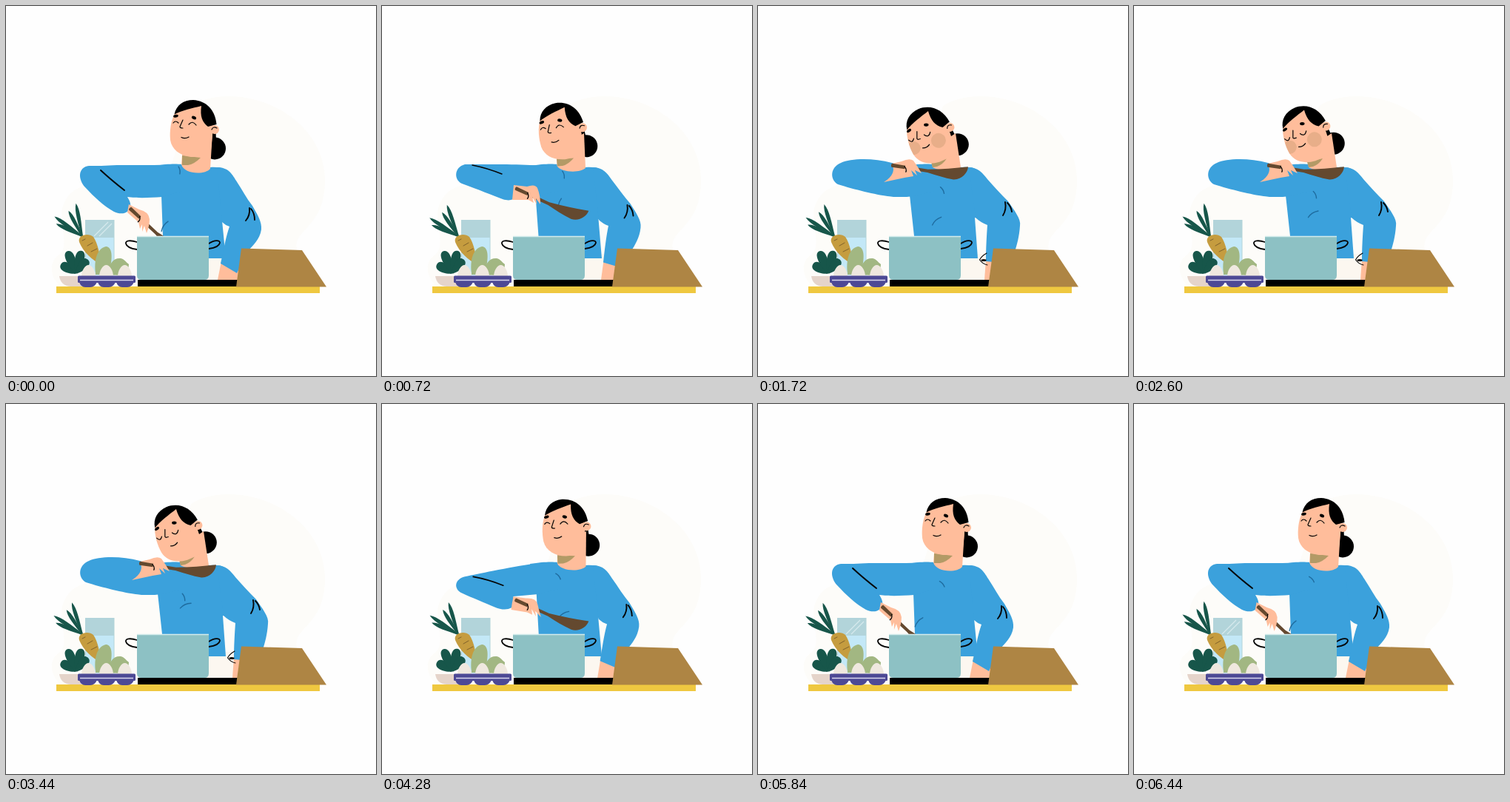
An HTML page that plays this animation: 500 by 500 pixels, repeating every 6.48 s.

```html
<!DOCTYPE html>
<html lang="en">
<head>
<meta charset="utf-8">
<title>Cooking</title>
<style>
  html, body { margin: 0; width: 100%; height: 100%; overflow: hidden; background: #fefefe; }
  svg { display: block; width: 100vw; height: 100vh; }
  .skin { fill: #ffbd9b; }
  .shirt { fill: #3ba1dc; }
  .wood { fill: #64492f; }
  .leaf { fill: #17564a; }
  .sage { fill: #a2b782; }
  .egg { fill: #efe8df; }
  .tray { fill: #4d4995; }
  .line { fill: none; stroke: #050505; stroke-linecap: round; stroke-linejoin: round; }
  .fold { fill: none; stroke: #1f6c9f; stroke-width: 1.4; stroke-linecap: round; }
</style>
</head>
<body>
<svg viewBox="0 0 500 500">
  <defs>
    <path id="face" d="M229 143C222 156 221 170 222 181C224 194 235 202 250 204L276 204L279 174L281 145L260 132Z"/>
    <clipPath id="faceClip"><use href="#face"/></clipPath>
  </defs>

  <path fill="#fdfcf9" d="M250 135C286 112 350 121 388 152C424 180 438 222 428 262C422 290 400 303 394 316C388 330 402 350 395 379H74C58 365 58 345 72 336C84 326 76 305 75 285C74 265 88 247 106 243L215 240Z"/>
  <path fill="#fcf7f0" d="M270 335H316V372H270Z"/>

  <!-- body -->
  <path id="farHand" class="skin"/>
  <path id="torso" class="shirt"/>
  <path id="farArm" class="shirt"/>
  <path id="farCrease" class="line" stroke-width="1.9"/>
  <g id="bun">
    <circle cx="282" cy="192.500" r="15"/>
    <path d="M278 170H283.500L284 182H276Z"/>
  </g>
  <path id="arm" class="shirt"/>
  <path id="crease" class="line"/>
  <path id="fold1" class="fold" d="M-5 0Q0 -2 5 0"/>
  <path id="fold2" class="fold" d="M-8 -1Q0 -4 8 0"/>
  <path id="neck" class="skin"/>
  <path id="shade" fill="#b39a66"/>

  <g id="head">
    <use href="#face" class="skin"/>
    <g id="blush" fill="#e8ae89" clip-path="url(#faceClip)">
      <circle cx="226" cy="173" r="9"/>
      <circle cx="260.500" cy="177" r="10"/>
    </g>
    <path d="M227.500 146.500C230 134 240 127 253 127C271 128 283 141 284.500 160L273 163C265 157 262 149 264 135C252 138 238 141 227.500 146.500Z"/>
    <circle class="skin" cx="282" cy="167" r="6"/>
    <path class="line" stroke-width="1.200" d="M278 167Q280 162 285 165"/>
    <ellipse cx="229.500" cy="148.700" rx="3.400" ry="1.900" transform="rotate(-12 229.500 148.700)"/>
    <ellipse cx="254" cy="151" rx="3.200" ry="2.100" transform="rotate(22 254 151)"/>
    <path id="eyes" class="line" stroke-width="1.200"/>
    <path class="line" stroke-width="1.200" d="M239 154L235 163Q235 165 239 165"/>
    <path class="line" stroke-width="1.300" d="M237 177.500Q242 180 247 177"/>
  </g>

  <!-- hand and ladle -->
  <path id="ladle" class="wood" d="M1 -2.200L50 -2Q78 -7 103 -14C104 -6 97 5 86 6C74 6 62 4 50 2.200L1 2.200Q-1 0 1 -2.200Z"/>
  <path id="hand" class="skin"/>
  <g id="grip">
    <path class="wood" d="M1 -2.500L19 -2.200V2.200L1 2.500Q-1 0 1 -2.500Z"/>
    <path class="line" stroke-width="1.300" d="M18 -1Q22 2 21 6"/>
  </g>

  <!-- glass -->
  <rect x="107" y="289" width="39.500" height="75" fill="#b2d4da"/>
  <rect x="108" y="313" width="37.500" height="51" fill="#c3e8f7"/>
  <path id="shine" stroke="#eef8fa" stroke-width="1.200" d="M119 311L138 292M126 311L143 294"/>

  <!-- vegetables -->
  <g id="tops" class="leaf"></g>
  <path fill="#c59c3f" d="M99 319C96 309 112 306 118 312C124 321 127 335 128 349C117 344 104 332 99 319Z"/>
  <path class="line" style="stroke:#80622b" d="M110 324L117 320M115 332L123 328M103 317L107 315"/>
  <g id="bush" class="leaf"></g>
  <path fill="#e5d4ca" d="M72 365H102V379H87Q74 378 72 365Z"/>
  <path class="sage" d="M121 361C119 345 122 328 135 325C145 326 144 342 139 363H121Z"/>
  <path class="sage" d="M137 363C139 347 146 340 155 341C160 342 162 346 166 349C166 358 160 363 155 364Z"/>
  <g class="egg">
    <path d="M102 366C102 357 107 350 111.500 350C116 350 121 357 121 366Z"/>
    <path d="M126 366C126 357 131 350 135.500 350C140 350 145 357 145 366Z"/>
    <path d="M151 366C151 357 156 350 160.500 350C165 350 170 357 170 366Z"/>
  </g>

  <!-- kitchen top -->
  <rect x="68" y="379" width="356" height="9" fill="#efc840"/>
  <g class="tray">
    <rect x="97" y="364.500" width="78" height="9.500" rx="1.500"/>
    <path d="M99 373H123Q120 380 114 380H107Q101 380 99 373ZM124 373H148Q145 380 139 380H132Q126 380 124 373ZM149 373H173Q170 380 164 380H157Q151 380 149 373Z"/>
  </g>
  <path stroke="#d9d7ee" stroke-width="1.300" d="M100 370.500H172"/>
  <rect x="178" y="370" width="136" height="9"/>
  <path class="line" stroke-width="1.800" d="M177 319C168 316 161 317 162 321C163 326 170 328 177 329M274 321C282 316 289 316 289 320C288 325 282 327 274 328"/>
  <path fill="#8dc1c4" d="M177 311H274V364Q274 370 268 370H183Q177 370 177 364Z"/>
  <path stroke="#d3ebec" stroke-width="1.500" d="M177 311.500H274"/>
  <g id="knob">
    <path class="line" stroke-width="1.100" d="M309 334Q302 338 299.500 343Q304 349 310 350"/>
    <ellipse cx="305" cy="343.500" rx="3.500" ry="1.500"/>
  </g>
  <path fill="#ae8544" d="M318 327.500L400 330L433 379.500H311Z"/>
</svg>

<script>
const LOOP = 6480, STEP = 40, SWAY = 1296;
const $ = id => document.getElementById(id);
const NUM = /-?\d+(\.\d+)?/g;

const clamp = v => Math.max(0, Math.min(1, v));
const ease = v => (1 - Math.cos(Math.PI * clamp(v))) / 2;
const ramp = (t, from, to) => ease((t - from) / (to - from));

// Blend two strings that differ only in their numbers.
function blend(a, b, k) {
  const end = b.match(NUM);
  let i = 0;
  return a.replace(NUM, n => (+n + (end[i++] - n) * k).toFixed(2));
}

// Sample a list of [position, string] keys.
function sample(keys, at) {
  let i = 1;
  while (i < keys.length - 1 && keys[i][0] < at) i++;
  const [p, a] = keys[i - 1], [q, b] = keys[i];
  return blend(a, b, clamp((at - p) / (q - p)));
}

const LIFTS = [0, 0.27, 0.5, 1];
const poses = (...list) => list.map((s, i) => [LIFTS[i], s]);
const pair = (a, b) => [[0, a], [1, b]];

// Shapes from stirring (0) to tasting (1).
const shapes = {
  torso: pair(
    'M200 216C218 213 230 213 238 214L276 218C291 217 299 221 305 229L311 289L292 290L297 341L214 341L212 311L210 256Z',
    'M200 216C218 213 230 213 238 214L276 218C291 217 299 221 305 229L311 289L293 286L297 341L214 341L211 311L205 256Z'),
  arm: poses(
    'M240 214L200 215C185 215 165 215 150 215C135 216 122 216 112 216C97 218 97 234 107 245C119 258 133 271 146 278C158 284 170 278 168 267C167 262 165 260 164 258C180 260 195 259 211 258L240 250Z',
    'M240 214L205 216C190 218 170 222 150 226C135 229 122 232 112 234C97 238 97 251 108 256C122 262 140 269 152 274C165 280 177 278 180 270C180 265 179 262 178 260C190 259 200 258 211 257L240 250Z',
    'M240 216L200 215C185 214 165 214 150 214C135 214 122 214 112 214C97 218 97 235 108 240C130 248 150 256 163 261C172 264 178 262 179 258C180 258 181 258 182 258C190 258 200 258 211 257L240 250Z',
    'M240 220L200 222C195 218 188 214 181 212C155 205 125 206 112 212C97 218 97 235 108 241C130 248 160 255 175 257C182 258 185 258 188 258C190 258 192 258 194 258C198 258 203 258 211 257L240 250Z'),
  hand: poses(
    'M166 268L180 275Q193 278 194 288Q194 297 190 307L187 297L184 305L184 295L181 301L179 292L164 279Q165 273 166 268Z',
    'M178 260L195 262Q209 261 211 270Q213 279 216 287L208 279L209 286L203 276L204 284L197 281L175 278Q176 269 178 260Z',
    'M178 242L196 244Q207 240 210 246Q214 256 214 268L208 260L209 268L203 258L205 266L198 262L176 262Q177 252 178 242Z',
    'M181 213L194 210Q205 205 210 209Q216 217 221 226L212 222L215 229L207 222L210 230L198 232L170 238Q188 227 181 213Z'),
  crease: poses(
    'M128 222Q142 235 160 249', 'M123 234Q143 237 164 245',
    'M122 215Q142 219 162 227', 'M122 215Q142 218 162 224'),
  farArm: pair(
    'M285 218C300 218 305 226 311 236C319 248 325 260 333 270C340 282 346 292 345 302C343 316 333 324 326 332L312 361L290 348C294 330 297 312 302 298Q296 296 292 292Z',
    'M285 218C297 218 304 226 310 234C319 244 329 255 338 264C346 276 356 288 354 297C353 312 350 322 347 332L340 348L308 345C308 328 309 310 310 296Q300 292 294 286Z'),
  farCrease: pair(
    'M324 290Q330 283 329 273M331 274Q336 280 336 289',
    'M331 283Q336 275 334 265M337 266Q342 271 343 278'),
  farHand: pair('M291 345L286 370L316 370L316 355Z', 'M308 343L306 370L316 370L316 345Z'),
  neck: pair(
    'M239 190L237 214C240 227 268 229 276 220L279 172Z',
    'M232 195L236 218C241 222 266 224 274 218L267 172Z'),
  shade: pair(
    'M238 202L263 205Q254 214 246 215L238 215Z',
    'M234 211L255 206Q250 214 242 217L236 218Z')
};
const eyeShapes = pair(
  'M226 158Q229 154 233 158M247 160Q252 154 257 161',
  'M224 160Q227 167 231 161M246 162Q250 169 255 162');
const ladleKeys = poses(
  'translate(167 273) rotate(43)', 'translate(180 264) rotate(23)',
  'translate(180 246) rotate(25)', 'translate(180 215) rotate(9)');

// Shirt folds wander with time: x, y, angle.
const TIMES = [0, 720, 1720, 3440, 4280, 5200, 6440, LOOP];
const wander = list => list.map(([x, y, a], i) => [TIMES[i], `translate(${x} ${y}) rotate(${a})`]);
const folds = {
  fold1: wander([[234, 222, 80], [245, 228, 75], [249, 249, 60], [240, 261, 70],
    [238, 233, 50], [258, 250, 50], [240, 237, 48], [234, 222, 80]]),
  fold2: wander([[215, 298, -60], [241, 268, -80], [242, 291, -45], [243, 273, -28],
    [246, 285, -35], [221, 290, -45], [215, 300, -60], [215, 298, -60]])
};

// A leaf pointing up from its base: angle, length, half widths at tip and waist.
function addLeaf(parent, x, y, angle, len, w, waist, high) {
  const leaf = document.createElementNS('http://www.w3.org/2000/svg', 'path');
  const top = -len * high, mid = -len * 0.4;
  leaf.setAttribute('d', `M-1 0C${-waist} ${mid} ${-w} ${top} 0 ${-len}C${w} ${top} ${waist} ${mid} 1 0Z`);
  parent.append(leaf);
  const turn = d => leaf.setAttribute('transform', `translate(${x} ${y}) rotate(${angle + d})`);
  turn(0);
  return turn;
}
const tops = [[-15, 45, 4.6], [-31, 39, 3], [-56, 46, 1.5], [-66, 39, 1.5]]
  .map(([angle, len, swing]) => [addLeaf($('tops'), 103, 311, angle, len, 4.5, 2, 0.8), swing]);
for (const [angle, len] of [[-60, 24], [-22, 32], [13, 31], [40, 24]])
  addLeaf($('bush'), 95, 361, angle, len, 9.5, 7, 1);

function draw(t) {
  const p = ramp(t, 100, 1340) - ramp(t, 3460, 4700);
  const phase = 2 * Math.PI * t / SWAY;
  const stir = 2 * Math.sin(phase) * clamp(1 - p / 0.27);
  const nod = 1.5 * Math.sin(Math.PI * clamp((t - 1900) / 1540)) ** 2;
  const set = (id, name, value) => $(id).setAttribute(name, value);

  for (const id in shapes) set(id, 'd', sample(shapes[id], p));
  for (const id in folds) set(id, 'transform', sample(folds[id], t));

  const tilt = `translate(${-p} ${2.5 * p - nod}) rotate(${-24 * p} 258 215)`;
  set('head', 'transform', tilt);
  set('bun', 'transform', tilt);
  set('eyes', 'd', sample(eyeShapes, ease((p - 0.6) / 0.4)));
  set('blush', 'opacity', ramp(t, 1300, 1650) - ramp(t, 2700, 3200));

  const hold = `translate(${stir} 0) ` + sample(ladleKeys, p);
  set('ladle', 'transform', hold);
  set('grip', 'transform', hold);
  set('hand', 'transform', `translate(${stir} 0)`);

  set('crease', 'stroke-width', 2 - clamp(p * 2) * 0.6);
  set('crease', 'opacity', clamp((1 - p) * 2.5));
  set('knob', 'opacity', clamp((p - 0.85) / 0.1));
  set('shine', 'opacity', 0.6 * clamp(1 - p * 4));
  for (const [turn, swing] of tops) turn(swing * (Math.cos(phase) - 0.1));
}

function tick() {
  draw(Math.floor(performance.now() % LOOP / STEP) * STEP);
  requestAnimationFrame(tick);
}
tick();
</script>
</body>
</html>
```
